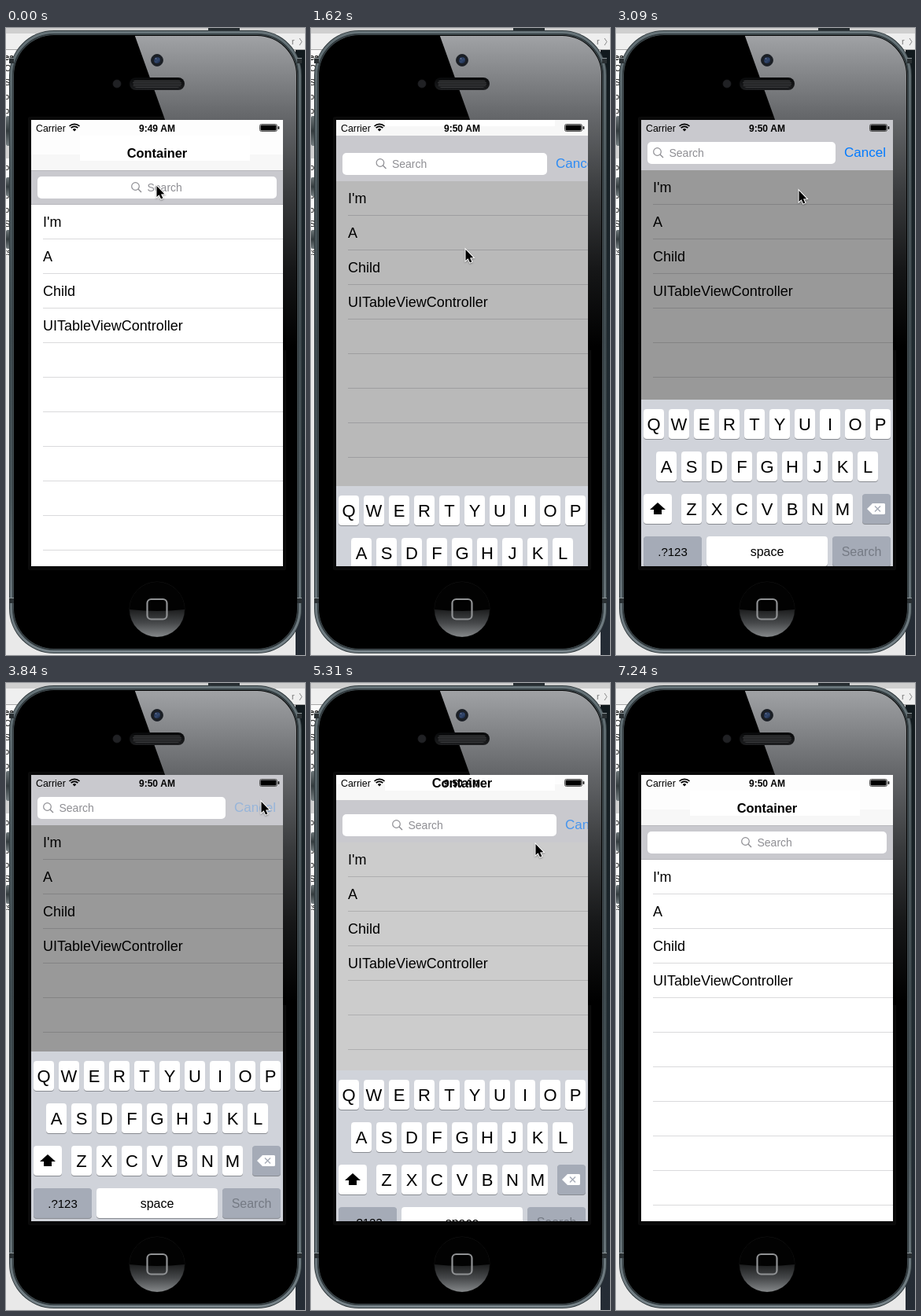
Write an HTML page with a canvas that moves like this. It is 380x798 px and loops after 8220 ms.

```html
<!DOCTYPE html>
<html lang="en">
<head>
<meta charset="utf-8">
<title>Container search</title>
<style>
html, body { margin: 0; width: 100%; height: 100%; overflow: hidden; background: #e6e6e6; }
canvas { display: block; width: 380px; height: 798px; }
</style>
</head>
<body>
<canvas id="stage" width="380" height="798"></canvas>
<script>
const LOOP = 8220;
const FONT = '"Liberation Sans", Arial, sans-serif';
const SCREEN = { x: 32, y: 117, w: 320, h: 568 };
const SLIDE = 295;
const stage = document.getElementById('stage').getContext('2d');
let c = stage;

// Bursts of redraws: first change, last change, number of changes.
const BURSTS = [[300, 1320, 8], [1620, 2510, 7], [2800, 3840, 8],
  [3990, 4720, 6], [5170, 5760, 5], [6060, 6210, 2], [6510, 7240, 6]];
const TOGGLES = [[300, true], [1620, false], [2800, true],
  [3990, false], [5170, true], [6510, false]];
// Pointer path: time, x, y.
const POINTER = [[0, 191, 201], [590, 191, 201], [1250, 196, 282], [1760, 196, 282],
  [2400, 232, 207], [3090, 232, 207], [3690, 324, 151], [4130, 324, 151],
  [4700, 285, 205], [5320, 285, 205], [5740, 192, 361], [6650, 192, 361], [7230, 192, 203]];

const clamp = v => Math.max(0, Math.min(1, v));
const mix = (a, b, k) => a + (b - a) * k;
const ease = v => { v = clamp(v); return v * v * (3 - 2 * v); };

function rect(x, y, w, h, fill) {
  c.fillStyle = fill;
  c.fillRect(x, y, w, h);
}
function round(x, y, w, h, r, fill, stroke, line = 1) {
  c.beginPath();
  c.roundRect(x, y, w, h, r);
  paint(fill, stroke, line);
}
function disc(x, y, r, fill, stroke, line = 1) {
  c.beginPath();
  c.arc(x, y, r, 0, 7);
  paint(fill, stroke, line);
}
function shape(points, fill, stroke, line = 1) {
  c.beginPath();
  points.forEach(([x, y]) => c.lineTo(x, y));
  c.closePath();
  paint(fill, stroke, line);
}
function paint(fill, stroke, line) {
  if (stroke) { c.strokeStyle = stroke; c.lineWidth = line; c.stroke(); }
  if (fill) { c.fillStyle = fill; c.fill(); }
}
function text(s, x, y, size, fill = '#000', align = 'left', weight = 'normal') {
  c.font = `${weight} ${size}px ${FONT}`;
  c.textAlign = align;
  c.fillStyle = fill;
  c.fillText(s, x, y);
}
function fade(x0, y0, x1, y1, ...colors) {
  const g = c.createLinearGradient(x0, y0, x1, y1);
  colors.forEach((col, i) => g.addColorStop(i / (colors.length - 1), col));
  return g;
}

function drawDesktop() {
  rect(0, 0, 380, 798, '#e9e9e9');
  rect(0, 0, 380, 7, '#cfcfcf');
  rect(0, 7, 380, 21, '#efefef');
  rect(0, 27, 380, 1, '#a8a8a8');
  rect(0, 28, 12, 262, '#fafafa');
  rect(0, 150, 8, 16, '#d2d2d2');
  [['ea', 41], ['C', 55], ['S', 73], ['o', 91], ['b', 109], ['o', 181],
    ['b', 217], ['o', 235], ['S', 253], ['o', 272], ['ts', 289]]
    .forEach(([s, y], i) => text(s, -2, y, 11, '#111', 'left', i ? 'normal' : 'bold'));
  text('r', 363, 21, 11, '#777');
  c.beginPath();
  c.moveTo(373, 13); c.lineTo(376, 17.5); c.lineTo(373, 22);
  paint(null, '#888', 1);
  rect(368, 28, 12, 770, fade(0, 28, 0, 798, '#11191d', '#202b31', '#252c35'));
}

function drawBody() {
  round(257, -4, 40, 12, 3, '#262d31');
  [[112, 38], [190, 24], [257, 24]].forEach(([y, h]) =>
    round(0, y, 8, h, 2, fade(0, y, 0, y + h, '#6d7679', '#333b3e', '#778083')));
  round(4, 3, 372, 793, 57, '#30393d');
  round(6.5, 5.5, 367, 788, 54.5, null,
    fade(0, 0, 0, 798, '#68757a', '#4a565b', '#3f4b50', '#4a565b', '#78848a'), 3);
  round(10, 9, 360, 781, 51, '#000', '#596469', 1);
  [[4, 38], [370, 38], [4, 725], [370, 725]].forEach(([x, y]) => {
    rect(x, y, 6, 7, '#2a3033');
    rect(x, y, 6, 1, '#8a9396');
  });
  round(28.5, 113.5, 327, 576, 2, '#090909', '#111');

  c.save();
  c.beginPath();
  c.roundRect(11, 10, 358, 779, 50);
  c.clip();
  shape([[163.5, 9], [372, 9], [372, 410], [307, 410]],
    fade(0, 10, 0, 405, '#a0a2a5', '#67696c', '#3a3c3e', '#161718', '#000'));
  c.restore();

  disc(192, 41, 7.5, '#1b1f25', '#2c3035');
  disc(192, 41, 4, fade(188, 37, 196, 46, '#16233f', '#34496f', '#101c36'));
  disc(190.5, 39, 1, '#66748f');
  disc(141, 71, 5, '#202124', '#17181a');

  round(157, 63, 70, 16, 8, fade(0, 63, 0, 79, '#08090a', '#1d1e20'));
  c.save();
  c.beginPath();
  c.roundRect(161, 66, 62, 10, 5);
  c.clip();
  rect(160, 65, 64, 12, '#161718');
  for (let y = 67; y < 77; y += 2)
    for (let x = 161 + y % 4 / 2; x < 224; x += 2) rect(x, y, 1, 1, '#626467');
  c.restore();

  disc(192, 740, 35, '#020202', '#151515');
  c.save();
  c.beginPath();
  c.arc(192, 740, 35, 0, 7);
  c.clip();
  c.beginPath();
  c.moveTo(157, 740);
  c.quadraticCurveTo(192, 744, 227, 740);
  c.lineTo(227, 776); c.lineTo(157, 776);
  paint(fade(0, 740, 0, 775, '#1c1d1e', '#47494b', '#85888a'));
  c.restore();
  round(179.5, 727, 25, 25.5, 5, null, '#909294', 2.2);
}

const shell = document.createElement('canvas');
shell.width = 380;
shell.height = 798;
c = shell.getContext('2d');
drawDesktop();
drawBody();
c = stage;

function snap(t) {
  let s = 0;
  for (const [from, to, n] of BURSTS) {
    if (t < from) break;
    const gap = (to - from) / (n - 1);
    s = from + gap * Math.min(n - 1, Math.floor((t - from + 12) / gap));
  }
  return s;
}

function stateAt(s) {
  let start = -1e4, open = false;
  for (const [at, dir] of TOGGLES) if (s >= at) { start = at; open = dir; }
  const u = s - start;
  const decay = u > 400 ? 0 : Math.exp(-0.0124 * u);
  const caret = !open || u < 400 || u > 1015 ? 0 : u > 880 ? 0.5 : 1;
  return {
    bar: open ? ease(u / SLIDE) : 1 - ease(u / SLIDE + 0.375),
    keys: open ? 1 - 0.69 * decay : 0.47 * decay,
    caret,
    pressed: open && s >= 3830 && s < 3990
  };
}

function drawNav(bar) {
  const dy = Math.round(-64 * bar);
  rect(32, 117, 320, 64, '#f7f7f7');
  rect(32, 117 + dy, 320, 44, '#fdfdfd');
  rect(94, 137 + dy, 216, 32, '#fff');
  if (bar < 0.6) text('Container', 192, 165 + dy, 16.4, '#000', 'center', 'bold');
}

function drawTable(bar) {
  const top = Math.round(225 - 44 * bar);
  rect(32, top, 320, 685 - top, '#fff');
  ["I'm", 'A', 'Child', 'UITableViewController']
    .forEach((s, i) => text(s, 47, top + 28 + 44 * i, 18));
  for (let i = 1; i < 12; i++) rect(47, top + 44 * i - 1, 305, 1, '#dadadc');
  rect(32, top, 320, 685 - top, `rgba(0,0,0,${0.4 * bar})`);
}

function drawSearch({ bar, caret, pressed }) {
  const top = Math.round(181 - 64 * bar), low = Math.round(225 - 44 * bar);
  const y = low - 36, right = Math.round(344 - 65 * bar), x = 159 - 112 * bar;
  rect(32, top, 320, low - top, '#c9c9ce');
  if (bar < 0.05) {
    rect(32, 181, 320, 1, '#b9b9bd');
    rect(32, 224, 320, 1, '#b9b9bd');
  }
  round(40, y, right - 40, 28, 5, '#fff');
  disc(x + 5.5, y + 12.5, 4.8, null, '#8e8e93', 1.2);
  c.beginPath();
  c.moveTo(x + 9, y + 16);
  c.lineTo(x + 13, y + 20);
  paint(null, '#8e8e93', 1.4);
  text('Search', x + 20.5, y + 18.7, 14, '#8e8e93');
  if (bar > 0) {
    c.globalAlpha = pressed ? 0.25 : 0.3 + 0.7 * bar;
    text('Cancel', right + 11, y + 18.5, 17, '#007aff');
    c.globalAlpha = 1;
  }
  if (caret) {
    c.globalAlpha = caret;
    rect(67, y + 4, 2, 18, '#426bf2');
    c.globalAlpha = 1;
  }
}

function drawStatus(time) {
  text('Carrier', 38, 131.5, 12.4);
  text(time, 192, 131.5, 12, '#000', 'center', 'bold');
  [3.2, 6.2, 9.2].forEach((r, i) => {
    c.beginPath();
    if (!i) c.moveTo(87, 131.5);
    c.arc(87, 131.5, r, -Math.PI * 0.75, -Math.PI * 0.25);
    i ? paint(null, '#000', 1.7) : paint('#000');
  });
  round(322.5, 122.5, 22, 9, 2, null, '#555');
  round(323.5, 123.5, 20, 7, 1, '#000');
  round(345.7, 125, 1.6, 4, 1, '#000');
}

function key(x, y, w, label, size = 22, dark = false, ink = '#000') {
  round(x, y + 1, w, 38, 4, '#888b91');
  round(x, y, w, 38, 4, dark ? '#a5abb7' : '#fff');
  if (label) text(label, x + w / 2, y + (size > 20 ? 27 : 24.5), size, ink, 'center');
}

function drawKeyboard(up) {
  if (up <= 0) return;
  const top = Math.round(685 - 216 * up);
  rect(32, top, 320, 216, '#d0d3da');
  ['QWERTYUIOP', 'ASDFGHJKL', 'ZXCVBNM'].forEach((row, r) =>
    [...row].forEach((ch, i) => key([35, 51, 83][r] + 32 * i, top + 12 + 54 * r, 26, ch)));

  const y = top + 120, m = y + 19;
  key(35, y, 36);
  shape([[53, m - 8], [63, m + 1], [58, m + 1], [58, m + 7],
    [48, m + 7], [48, m + 1], [43, m + 1]], '#000');
  key(313, y, 36, '', 22, true);
  shape([[319, m], [326, m - 7], [341, m - 7], [342, m - 6],
    [342, m + 6], [341, m + 7], [326, m + 7]], '#fff');
  c.beginPath();
  c.moveTo(329, m - 3.5); c.lineTo(336, m + 3.5);
  c.moveTo(336, m - 3.5); c.lineTo(329, m + 3.5);
  paint(null, '#a5abb7', 1.4);

  key(35, top + 174, 74, '.?123', 15, true);
  key(115, top + 174, 154, 'space', 16);
  key(275, top + 174, 74, 'Search', 16, true, '#757a84');
}

function drawPointer(s) {
  if (s >= 7235) return;
  const i = POINTER.findIndex(p => p[0] > s);
  const [t0, x0, y0] = POINTER[i - 1], [t1, x1, y1] = POINTER[i];
  const k = ease((s - t0) / (t1 - t0));
  c.save();
  c.translate(mix(x0, x1, k), mix(y0, y1, k));
  c.shadowColor = 'rgba(0,0,0,.35)';
  c.shadowBlur = 2;
  c.shadowOffsetY = 1;
  const arrow = [[0.5, 0], [0.5, 14], [3.6, 11.2], [6, 16.5], [8.4, 15.4], [6, 10.4], [10.3, 10.2]];
  shape(arrow, null, '#fff', 2);
  c.shadowColor = 'transparent';
  shape(arrow, '#000');
  c.restore();
}

function render(t) {
  const s = snap(t), state = stateAt(s);
  c.drawImage(shell, 0, 0);
  c.save();
  c.beginPath();
  c.rect(SCREEN.x, SCREEN.y, SCREEN.w, SCREEN.h);
  c.clip();
  drawNav(state.bar);
  drawTable(state.bar);
  drawSearch(state);
  drawStatus(s < 880 ? '9:49 AM' : '9:50 AM');
  drawKeyboard(state.keys);
  drawPointer(s);
  c.restore();
}

const began = performance.now();
function tick() {
  render((performance.now() - began) % LOOP);
  requestAnimationFrame(tick);
}
tick();
</script>
</body>
</html>
```
